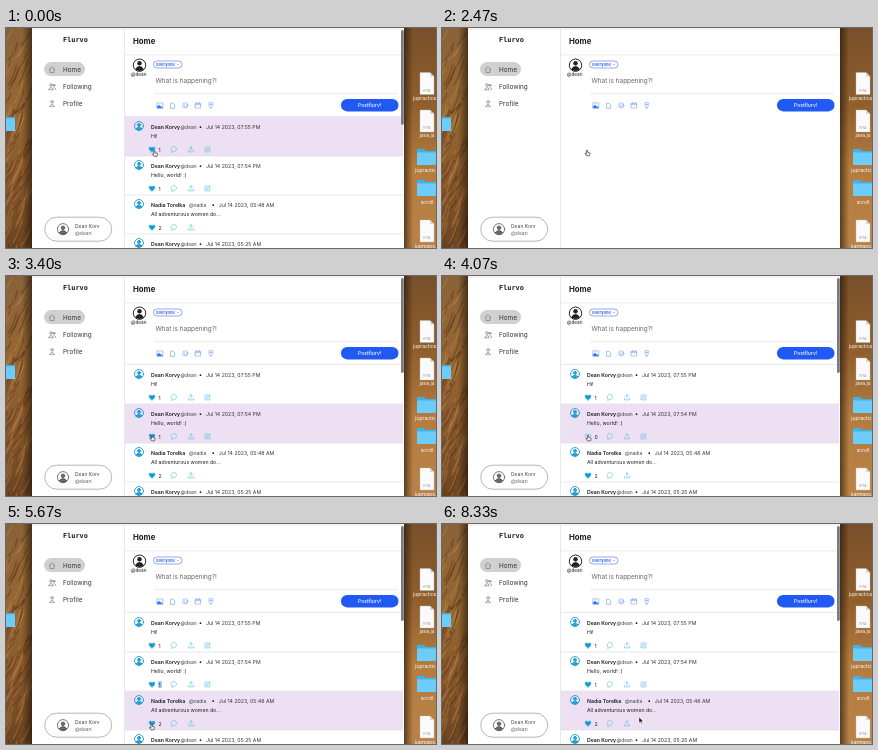
An HTML page for the animation above (8.54 s loop, 430x220 px).

```html
<!DOCTYPE html>
<html lang="en">
<head>
<meta charset="utf-8">
<title>Social feed</title>
<style>
  html, body { margin: 0; width: 100%; height: 100%; overflow: hidden; }
  svg { display: block; width: 430px; height: 220px; font-family: Inter, sans-serif; font-size: 5.2px; fill: #1c1c1c; }
  .bold { font-weight: 600; }
  .grey { fill: #666; }
  .icon { fill: none; stroke: #5db9e0; stroke-width: .6; stroke-linecap: round; stroke-linejoin: round; }
  .tool { stroke: #6c9df2; }
  .nav { stroke: #6a6a6a; }
  .rule { stroke: #dedee2; stroke-width: .7; }
  .label { fill: #fff; font-size: 5px; text-anchor: middle; }
</style>
</head>
<body>
<svg viewBox="0 0 430 220">
  <defs>
    <linearGradient id="fur" x2="0" y2="1">
      <stop stop-color="#8a6238"/><stop offset=".4" stop-color="#976733"/>
      <stop offset=".7" stop-color="#85562a"/><stop offset="1" stop-color="#6b4422"/>
    </linearGradient>
    <linearGradient id="dusk" x2="0" y2="1">
      <stop stop-color="#78502a"/><stop offset=".35" stop-color="#905f2c"/>
      <stop offset=".65" stop-color="#b57c40"/><stop offset="1" stop-color="#b98248"/>
    </linearGradient>
    <linearGradient id="shade">
      <stop stop-color="#1c0f04" stop-opacity=".6"/><stop offset="1" stop-color="#1c0f04" stop-opacity="0"/>
    </linearGradient>
    <path id="heart" d="M0 2.8C-2 1.2-3 .2-3-1C-3-2.9-.8-3 0-1.4C.8-3 3-2.9 3-1C3 .2 2 1.2 0 2.8Z"/>
    <path id="comment" d="M-1.9 2.8L-1.6 1.6A2.7 2.5 0 1 1 0 2.2Z"/>
    <path id="share" d="M0 1V-2.6M-1.5-1.2L0-2.7L1.5-1.2M-2.6 .8V2.5H2.6V.8"/>
    <path id="edit" d="M.6-2.3H-2.5V2.5H2.3V-.2M-.8 .8L-.5-.4L2.2-2.8L2.9-2L.4 .5Z"/>
    <g id="person">
      <circle r="2.8"/>
      <circle cy="-.7" r=".9" fill="currentColor"/>
      <path d="M-1.9 1.8Q0-.6 1.9 1.8Q0 3.4-1.9 1.8Z" fill="currentColor"/>
    </g>
    <g id="page">
      <path fill="#fafafa" stroke="#bbb" stroke-width=".4" d="M-7-11H3L7-7V11H-7Z"/>
      <path fill="#d5d5d5" d="M3-11V-7H7Z"/>
      <text y="8" font-size="3" text-anchor="middle" fill="#999">HTML</text>
    </g>
    <g id="folder">
      <path fill="#3fb2e8" d="M-10-8H-3L-1-6H10V8H-10Z"/>
      <path fill="#6ccdfa" d="M-10-4.5H10V8H-10Z"/>
    </g>
  </defs>

  <rect width="30" height="220" fill="url(#fur)"/>
  <g id="hairs" fill="none" stroke-width="1.3"></g>
  <rect x="-26" width="10" height="220" fill="url(#shade)" transform="scale(-1 1)"/>
  <rect x="396" width="34" height="220" fill="url(#dusk)"/>
  <rect x="398" width="9" height="220" fill="url(#shade)"/>
  <use href="#folder" x="-1" y="95"/>
  <g id="desktop"></g>

  <path fill="#fff" d="M26 0H398V220H26Z"/>
  <path class="rule" d="M26 1H398M118.5 1V220M119 26.9H397M148 65.8H392"/>
  <text x="57" y="14" font-family="DejaVu Sans Mono, monospace" font-size="6.9" font-weight="700">Flurvo</text>
  <g transform="translate(0 .5)">
    <rect x="38" y="33.6" width="41" height="14" rx="7" fill="#d0d0d0"/>
    <g class="icon nav">
      <path d="M43.2 41L46 38.3L48.8 41M44 40.6V44H48V40.6"/>
      <circle cx="45" cy="56.5" r="1.3"/><circle cx="48" cy="56.8" r="1"/>
      <path d="M42.7 61Q45 56.8 47.3 61ZM48 59Q49.6 59 49.8 61"/>
      <circle cx="46" cy="73.4" r="1.3"/><path d="M43.8 77.8Q46 73.5 48.2 77.8Z"/>
    </g>
    <g font-size="6.4" fill="#333">
      <text x="57" y="43.4">Home</text>
      <text x="57" y="60.4">Following</text>
      <text x="57" y="77.4">Profile</text>
    </g>
    <rect x="38.7" y="188.7" width="67" height="24" rx="12" fill="#fff" stroke="#95959f" stroke-width=".7"/>
    <use href="#person" class="icon" transform="translate(57 200.7) scale(2)" style="stroke:#666;color:#666;stroke-width:.45"/>
    <text x="69" y="199" font-size="5" fill="#444">Dean Korv</text>
    <text x="69" y="206.7" font-size="5" class="grey">@dean</text>
  </g>

  <text x="127" y="16" font-size="7.8" font-weight="700">Home</text>
  <g transform="translate(0 .4)">
    <circle cx="133.5" cy="36.8" r="6.2" fill="#fff" stroke="#222" stroke-width="1"/>
    <circle cx="133.5" cy="34.8" r="2.2" fill="#222"/>
    <path d="M129 40.8Q133.5 34.6 138 40.8Q133.5 44.3 129 40.8Z" fill="#222"/>
    <text x="132.7" y="47.6" font-size="4.7" text-anchor="middle">@dean</text>
    <rect x="147.5" y="32.6" width="28.5" height="7" rx="3.5" fill="#fff" stroke="#6485ea" stroke-width=".7"/>
    <text x="150.3" y="37.6" font-size="4" font-weight="700" fill="#3b62e0">Everyone</text>
    <path class="icon tool" d="M171 35.7L172 36.7L173 35.7"/>
    <text x="149.5" y="54.3" font-size="6.4" class="grey">What is happening?!</text>
    <g class="icon tool">
      <path d="M151.2 74.5H156.8V79.5H151.2Z"/><path fill="#2b70ee" d="M151.2 79.5V78L153 76.5L156.8 79.5Z"/>
      <path d="M164.5 79.5V74.8H167L168.6 76.4V79.5Z"/>
      <circle cx="179.3" cy="77" r="2.6"/><path d="M178.1 77.8Q179.3 79 180.5 77.8M178.3 76.2V76.4M180.3 76.2V76.4"/>
      <path d="M189.4 75H194.6V79.6H189.4ZM189.4 76.3H194.6M190.7 74V75M193.3 74V75"/>
      <path d="M204.8 80Q200.5 74 204.8 74Q209.1 74 204.8 80Z"/><circle cx="204.8" cy="76" r=".5"/>
    </g>
    <rect x="335" y="70.6" width="57.5" height="12.4" rx="6.2" fill="#2159f5"/>
    <text x="363.7" y="78.6" font-size="5" class="bold" fill="#dfe7ff" text-anchor="middle">Postflurv!</text>
  </g>

  <g id="feed"></g>
  <path id="arrow" d="M0 0V6L1.4 4.8L2.3 6.8L3.3 6.4L2.4 4.4H4.2Z" fill="#111" stroke="#fff" stroke-width=".5"/>
  <path id="hand" d="M-.6 .4Q0-.5 .6 .4V2.2L2.7 2.8Q3.3 3 3 4L2.5 5.8H-.5L-2 3.7Q-2 2.8-.6 3.8Z" fill="#eee" stroke="#222" stroke-width=".6"/>
</svg>
<script>
const LOOP = 8540;
const ROW_TOP = 89, ROW_HEIGHT = 39;
const $ = id => document.getElementById(id);
const dean = { name: 'Dean Korvy', handle: '@dean', shift: 0, own: true };
const nadia = { name: 'Nadia Torelka', handle: '@nadia', shift: 8.5 };

// "off" is the span during which the post is not liked.
const posts = [
  { by: dean, date: 'Jul 14 2023, 07:55 PM', text: 'Hi!', likes: 1, off: [270, 2000] },
  { by: dean, date: 'Jul 14 2023, 07:54 PM', text: 'Hello, world! :)', likes: 1, off: [3870, 4340] },
  { by: nadia, date: 'Jul 14 2023, 05:48 AM', text: 'All adventurous women do...', likes: 2, off: [6530, 7330] },
  { by: dean, date: 'Jul 14 2023, 05:25 AM', text: '', likes: 1, off: [0, 0] }
];
const reload = [2400, 2630];
const hovers = [[0, 0], [2400, -1], [2800, 0], [3060, 1], [5060, 2]];
const selections = [[0, -1], [4400, 1], [6530, 2], [7330, -1]];
const shapes = [[0, 'hand'], [4600, 'arrow'], [5330, 'hand'], [7670, 'arrow']];
const path = [
  [0, 148.5, 122.5], [300, 148.5, 122.5], [930, 158, 121], [1130, 158, 121], [1670, 148, 122],
  [2070, 145, 122], [2730, 145, 122], [3130, 146, 159], [4400, 146, 159],
  [4660, 154, 160], [5000, 152, 171], [5400, 145.5, 200], [6560, 145.5, 200],
  [6800, 152.5, 199], [7000, 152.5, 199], [7200, 146, 199], [7400, 146, 199],
  [7670, 160, 197], [8000, 172, 195], [8330, 197, 193]
];

const icon = (name, x) => `<use href="#${name}" x="${x}" y="32.4" class="icon"/>`;

function postMarkup({ by, date, text }, i) {
  const { shift } = by;
  return `<g transform="translate(0 ${ROW_TOP + i * ROW_HEIGHT})">
    <rect class="back" x="119" width="278" height="${ROW_HEIGHT}" fill="#eee0f3"/>
    <path class="rule" d="M119 ${ROW_HEIGHT}H397"/>
    <use href="#person" class="icon" transform="translate(133 9) scale(1.6)" style="stroke:#27a0d2;color:#27a0d2"/>
    <text x="145" y="12" class="bold">${by.name}</text>
    <text x="${174.5 + shift}" y="12" font-size="4.9" fill="#444">${by.handle}</text>
    <circle cx="${194.5 + shift * 1.5}" cy="10.2" r=".9"/>
    <text x="${200 + shift * 1.5}" y="12" fill="#333">${date}</text>
    <text x="145" y="21">${text}</text>
    <rect class="mark" x="152" y="29" width="4" height="7" fill="#a9cdf5"/>
    <use href="#heart" x="146" y="32.4" class="icon heart"/>
    <text class="count" x="152.4" y="34.5"></text>
    ${icon('comment', 167.7)}${icon('share', 185)}${by.own ? icon('edit', 201.5) : ''}
  </g>`;
}

$('feed').innerHTML = posts.map(postMarkup).join('') +
  '<path class="rule" d="M119 88.5H397"/><rect x="395" y="2" width="2.8" height="95" rx="1.4" fill="#777b82"/>';
const rows = [...$('feed').querySelectorAll('g')].map(g => ({
  back: g.querySelector('.back'), mark: g.querySelector('.mark'),
  heart: g.querySelector('.heart'), count: g.querySelector('.count')
}));

$('desktop').innerHTML = [
  ['page', 421, 55.5, 'jupractice.h', 72], ['page', 421, 93, 'java.js', 109],
  ['folder', 421, 129, 'jupractice', 144], ['folder', 421, 160, 'scroll', 176],
  ['page', 421, 203, 'jupmaps.h', 220]
].map(([kind, x, y, label, base]) =>
  `<use href="#${kind}" x="${x}" y="${y}"/><text class="label" x="${x}" y="${base}">${label}</text>`).join('');

const noise = n => Math.abs(Math.sin(n * 127.1) * 43758.5) % 1;
$('hairs').innerHTML = Array.from({ length: 90 }, (_, i) => {
  const x = noise(i + 1) * 30, y = noise(i + 200) * 220, length = 10 + noise(i + 400) * 20;
  return `<path d="M${x} ${y}q-2 ${length / 2} -9 ${length}" stroke="${i % 2 ? '#4a2b12' : '#c08d4e'}" opacity=".4"/>`;
}).join('');

const within = (t, [start, end]) => t >= start && t < end;
const latest = (steps, t) => steps.filter(step => step[0] <= t).pop()[1];
const show = (el, on) => el.setAttribute('visibility', on ? 'inherit' : 'hidden');

function cursorAt(t) {
  const next = path.findIndex(point => point[0] > t);
  if (next < 0) return path[path.length - 1].slice(1);
  const [t0, x0, y0] = path[next - 1], [t1, x1, y1] = path[next];
  const u = (t - t0) / (t1 - t0), ease = u * u * (3 - 2 * u);
  return [x0 + (x1 - x0) * ease, y0 + (y1 - y0) * ease];
}

function draw(now) {
  const t = now % LOOP;
  const hover = latest(hovers, t), selected = latest(selections, t);
  show($('feed'), !within(t, reload));
  rows.forEach((row, i) => {
    const liked = !within(t, posts[i].off);
    show(row.back, i === hover);
    show(row.mark, i === selected);
    row.heart.style.fill = liked ? '#159bd3' : 'none';
    row.count.textContent = posts[i].likes - !liked;
  });
  const [x, y] = cursorAt(t), shape = latest(shapes, t);
  for (const id of ['arrow', 'hand']) {
    show($(id), id === shape);
    $(id).setAttribute('transform', `translate(${x} ${y})`);
  }
}

const start = performance.now();
function tick() {
  draw(performance.now() - start);
  requestAnimationFrame(tick);
}
tick();
</script>
</body>
</html>
```
